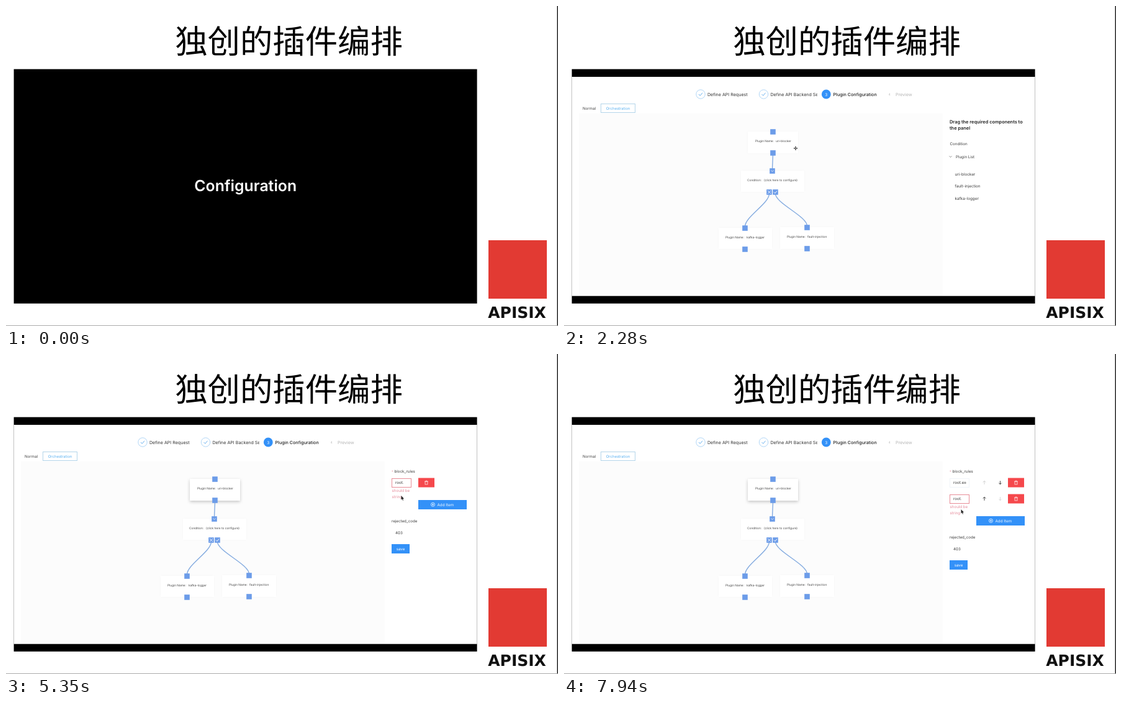
Animation, 889 px wide and 515 px high, one loop 8 s. Source, as an HTML page with a canvas:

```html
<!DOCTYPE html>
<html lang="zh">
<head>
<meta charset="utf-8">
<title>独创的插件编排</title>
<style>
html, body { margin: 0; width: 100%; height: 100%; overflow: hidden; background: #fff; }
canvas { display: block; width: 889px; height: 515px; }
</style>
</head>
<body>
<canvas id="stage" width="889" height="515"></canvas>
<script>
const ctx = document.getElementById('stage').getContext('2d');
ctx.textRendering = 'geometricPrecision';
const LOOP = 8000;
const SELECT = 2500, ADD_FIRST = 4020, ADD_SECOND = 6560;
const BLUE = '#3391f8', PORT = '#6c9ce9', RED = '#f5484c', INK = '#3c3c3c';
const UI = 'Inter, "Open Sans", sans-serif';

// time, x, y
const pointerPath = [
  [80, 456, 270], [1300, 456, 270], [2150, 373, 229], [2700, 373, 229],
  [3650, 677, 208], [4200, 677, 208], [4600, 637, 208], [4850, 637, 208],
  [5200, 638, 232], [5750, 638, 232], [6300, 688, 238], [6850, 688, 238],
  [7200, 637, 234], [7400, 637, 234], [7700, 641, 254], [8000, 641, 254]
];

const ramp = (t, a, b) => Math.min(1, Math.max(0, (t - a) / (b - a)));
const ease = p => p * p * (3 - 2 * p);
const mix = (a, b, p) => a + (b - a) * p;

function pointerAt(t) {
  const i = Math.max(1, pointerPath.findIndex(k => k[0] > t));
  const [t0, x0, y0] = pointerPath[i - 1], [t1, x1, y1] = pointerPath[i];
  const p = ease(ramp(t, t0, t1));
  return [mix(x0, x1, p), mix(y0, y1, p)];
}

function box(x, y, w, h, fill) {
  ctx.fillStyle = fill;
  ctx.fillRect(x, y, w, h);
}

function frame(x, y, w, h, color) {
  ctx.strokeStyle = color;
  ctx.lineWidth = 1;
  ctx.strokeRect(x + .5, y + .5, w - 1, h - 1);
}

function text(s, x, y, size = 6, color = INK, weight = 400, align = 'left', family = UI) {
  ctx.font = `${weight} ${size}px ${family}`;
  ctx.fillStyle = color;
  ctx.textAlign = align;
  ctx.fillText(s, x, y);
}

function line(points, color, width = 1) {
  ctx.beginPath();
  points.forEach(([x, y]) => ctx.lineTo(x, y));
  ctx.strokeStyle = color;
  ctx.lineWidth = width;
  ctx.stroke();
}

function dot(x, y, r, fill, stroke) {
  ctx.beginPath();
  ctx.arc(x, y, r, 0, 7);
  if (fill) { ctx.fillStyle = fill; ctx.fill(); }
  if (stroke) { ctx.strokeStyle = stroke; ctx.lineWidth = .9; ctx.stroke(); }
}

function fade(alpha, draw) {
  ctx.save();
  ctx.globalAlpha *= alpha;
  draw();
  ctx.restore();
}

const check = (x, y, s, color) =>
  line([[x - s, y], [x - s * .25, y + s * .75], [x + s, y - s * .75]], color);

function cross(x, y, s, color) {
  line([[x - s, y - s], [x + s, y + s]], color);
  line([[x + s, y - s], [x - s, y + s]], color);
}

function slide() {
  box(0, 0, 889, 515, '#fff');
  text('独创的插件编排', 455.5, 76, 52.4, '#000', 500, 'center', '"Noto Sans CJK SC", "Noto Sans CJK", sans-serif');
  box(12.6, 101.6, 746, 377.2, '#000');
  box(777, 377, 94, 94, '#e23a33');
  text('APISIX', 823, 502, 25, '#111', 700, 'center', '"DejaVu Sans", sans-serif');
  box(887.5, 0, 1.5, 515, '#222');
  box(0, 514, 889, 1, '#aaa');
}

function steps() {
  for (const x of [220, 321.5]) {
    dot(x, 142, 7.2, '#fff', '#a9d2f5');
    check(x, 142, 3, '#6ab2f0');
  }
  text('Define API Request', 231, 144.7, 7.1, '#333');
  ctx.save();
  ctx.beginPath();
  ctx.rect(332, 134, 76, 16);
  ctx.clip();
  text('Define API Backend Server', 332.5, 144.7, 7.1, '#333');
  ctx.restore();
  dot(422.3, 142, 7.4, BLUE);
  text('3', 422.3, 144.5, 6.5, '#fff', 400, 'center');
  text('Plugin Configuration', 433.5, 144.7, 7.2, '#222', 500);
  text('4', 524, 144.2, 5, '#bbb', 400, 'center');
  text('Preview', 534, 144.7, 7.1, '#b4b4b4');

  text('Normal', 30, 166.6, 6.2, '#444');
  frame(59, 157, 56, 15, '#b4d5ea');
  text('Orchestration', 87, 166.6, 6, '#58b0f0', 400, 'center');
}

function card(x, y, w, h, raised) {
  ctx.save();
  ctx.shadowColor = raised ? 'rgba(0,0,0,.22)' : 'rgba(0,0,0,.03)';
  ctx.shadowBlur = raised ? 5 : 3;
  ctx.shadowOffsetY = raised ? 2 : 0;
  box(x, y, w, h, '#fff');
  ctx.restore();
}

const port = (x, y) => box(x - 4.3, y - 4.3, 8.6, 8.6, PORT);

function wire(x0, y0, x1, y1) {
  const d = (y1 - y0) * .3;
  ctx.beginPath();
  ctx.moveTo(x0, y0);
  ctx.bezierCurveTo(x0, y0 + d, x1, y1 - d, x1, y1);
  ctx.strokeStyle = '#84abe0';
  ctx.lineWidth = 1.4;
  ctx.stroke();
}

function node(x, y, w, h, label, labelX, name, nameX, raised) {
  card(x, y, w, h, raised);
  const base = y + h / 2 - .5;
  text(label, labelX, base, 4.8, '#444');
  text(name, nameX, base, 4.8, '#444');
}

function graph(raised) {
  box(24, 173, 586, 293, '#fcfcfc');
  const lift = raised ? 1 : 0;
  node(296, 202 - lift, 81, 35, 'Plugin Name:', 308, 'uri-blocker', 341, raised);
  node(285, 265, 102, 34, 'Condition:', 295, '(click here to configure)', 322);
  node(249, 357, 86, 34, 'Plugin Name:', 260, 'kafka-logger', 294);
  node(348, 356, 87, 35, 'Plugin Name:', 359, 'fault-injection', 392);
  wire(336.5, 237, 335.5, 265);
  wire(330.5, 302, 291.5, 355);
  wire(340.5, 302, 391.5, 354);
  port(336.5, 202.5 - lift);
  port(336.5, 236.5 - lift);
  port(335.5, 265.5);
  port(330.5, 299.5);
  port(340.5, 299.5);
  for (const [x, y] of [[291.5, 357.5], [391.5, 356.5]]) {
    port(x, y);
    port(x, y + 34);
  }
  line([[333.5, 264.5], [335.5, 266.5], [337.5, 264.5]], '#dce8fb');
  cross(330.5, 299.5, 2.3, '#fff');
  check(340.5, 299.5, 2.5, '#fff');
}

function componentList() {
  text('Drag the required components to', 621, 189, 7.4, '#222', 600);
  text('the panel', 621, 199, 7.4, '#222', 600);
  text('Condition', 621.5, 223.5, 6.2);
  line([[620.5, 241.5], [622.5, 243.5], [624.5, 241.5]], '#777', .8);
  text('Plugin List', 631, 244.5, 6.2);
  ['uri-blocker', 'fault-injection', 'kafka-logger']
    .forEach((s, i) => text(s, 629.5, 272.7 + i * 19.6, 6.3));
}

function trash(x, y) {
  box(x, y - 7.5, 26, 15, RED);
  const c = x + 13;
  ctx.strokeStyle = '#ffe3e3';
  ctx.lineWidth = .8;
  ctx.strokeRect(c - 2, y - 1.7, 4, 4.6);
  line([[c - 3, y - 1.9], [c + 3, y - 1.9]], '#ffe3e3', .8);
  line([[c - 1.2, y - 3], [c + 1.2, y - 3]], '#ffe3e3', .8);
}

function arrow(x, y, dir, color) {
  line([[x, y - 2.8 * dir], [x, y + 2.8 * dir]], color, .9);
  line([[x - 2.2, y + .6 * dir], [x, y + 2.8 * dir], [x + 2.2, y + .6 * dir]], color, .9);
}

function typed(t, start) {
  return 'root.exe'.slice(0, Math.floor(Math.max(0, t - start) / 95));
}

function ruleRow(t, i, count) {
  const y = 207 + 26 * i;
  const born = i ? ADD_SECOND : ADD_FIRST;
  const value = typed(t, i ? 7420 : 4850);
  const error = ramp(t, born, born + 60) * (i ? 1 : 1 - ramp(t, 5450, 5700));

  frame(621, y - 7, 32, 15, '#f0f4f9');
  fade(error, () => frame(621, y - 7, 32, 15, '#e88d98'));
  ctx.save();
  ctx.beginPath();
  ctx.rect(623, y - 7, 25, 14);
  ctx.clip();
  text(value, 627, y + 2.3, 6.2, '#333');
  ctx.restore();
  if (!value) {
    const grow = ramp(t, born, born + 130);
    dot(645, y + .3, 3.6 * grow, '#e8404a');
    if (grow === 1) cross(645, y + .3, 1.2, '#fff');
  }
  const shown = error * ramp(t, born + 80, born + 300);
  fade(shown, () => {
    text('should be', 621.5, y + 15, 6.2, '#e58a9a');
    text('string', 621.5, y + 25.3, 6.2, '#e58a9a');
  });

  if (count === 1) return trash(664, y);
  const hover = i ? 1 - ramp(t, 6900, 7150) : 0;
  fade(hover, () => frame(664, y - 7, 26, 15, '#d8e2ea'));
  arrow(677, y, -1, i ? (hover > .3 ? '#58a8ee' : '#333') : '#ccc');
  arrow(702.5, y, 1, i ? '#d4d4d4' : '#333');
  trash(715, y);
}

function addButton(t, y) {
  const first = ramp(t, 3450, 3600) * (1 - ramp(t, 4130, 4450));
  const second = ramp(t, 6150, 6300) * (1 - ramp(t, 6700, 7000));
  box(664, y - 7, 78, 15, BLUE);
  fade(Math.max(first, second), () => box(664, y - 7, 78, 15, '#48abff'));
  dot(687.5, y + .3, 3, null, '#e6f3ff');
  line([[686, y + .3], [689, y + .3]], '#fff', .8);
  line([[687.5, y - 1.2], [687.5, y + 1.8]], '#fff', .8);
  text('Add Item', 694.5, y + 2.6, 6.3, '#f0f8ff');
}

function form(t) {
  const count = t < ADD_FIRST ? 0 : t < ADD_SECOND ? 1 : 2;
  const y = 216 + 26 * count;
  text('*', 621, 191, 5, '#e58a9a');
  text('block_rules', 625.5, 190.8, 6.2);
  for (let i = 0; i < count; i++) ruleRow(t, i, count);
  addButton(t, y);
  fade(1 - ramp(t, 4050, 4300), () => text('is a required property', 621, y + 15.2, 6.2, '#e56272'));
  text('rejected_code', 621, y + 28.6, 6.2);
  text('403', 627, y + 47.8, 6.2);
  box(621, y + 64, 29, 15, BLUE);
  text('save', 635.5, y + 73.6, 6.2, '#fff', 400, 'center');
}

function shape(x, y, points) {
  ctx.beginPath();
  points.forEach(([a, b]) => ctx.lineTo(x + a, y + b));
  ctx.closePath();
}

function pointer(t) {
  const [x, y] = pointerAt(t);
  const onNode = x > 296 && x < 378 && y < 237;
  const onButton = x > 664 && y > 200 && y < 250;
  const onInput = x > 622 && x < 652 && (t < 5000 ? y < 214 : t > ADD_SECOND && y < 241);
  if (onNode) {
    line([[x - 3, y], [x + 3, y]], '#444', 1);
    line([[x, y - 3], [x, y + 3]], '#444', 1);
    for (const [dx, dy] of [[2.3, 0], [-2.3, 0], [0, 2.3], [0, -2.3]]) box(x + dx - .7, y + dy - .7, 1.4, 1.4, '#444');
  } else if (onButton) {
    shape(x, y, [[-2, -4], [-.8, -4], [-.6, -1], [2.6, -.2], [2.6, 2], [1.6, 4], [-1.2, 4], [-3.2, 1], [-2, .6]]);
    ctx.fillStyle = '#fff';
    ctx.fill();
    ctx.strokeStyle = '#333';
    ctx.lineWidth = .8;
    ctx.stroke();
  } else if (onInput) {
    line([[x, y - 3.5], [x, y + 3.5]], '#333', .8);
  } else {
    shape(x, y, [[-1.5, -4], [-1.5, 2.5], [0, 1.3], [1, 3.7], [2, 3.2], [1, 1], [3, 1]]);
    ctx.fillStyle = '#222';
    ctx.fill();
  }
}

function render(t) {
  slide();
  if (t < 80) {
    text('Configuration', 385.7, 298, 24.8, '#fff', 600, 'center');
    return;
  }
  box(12.6, 114, 746, 352.7, '#fff');
  steps();
  graph(t >= SELECT);
  if (t < SELECT) componentList();
  else form(t);
  pointer(t);
}

const start = performance.now();
function tick() {
  render((performance.now() - start) % LOOP);
  requestAnimationFrame(tick);
}
tick();
</script>
</body>
</html>
```
